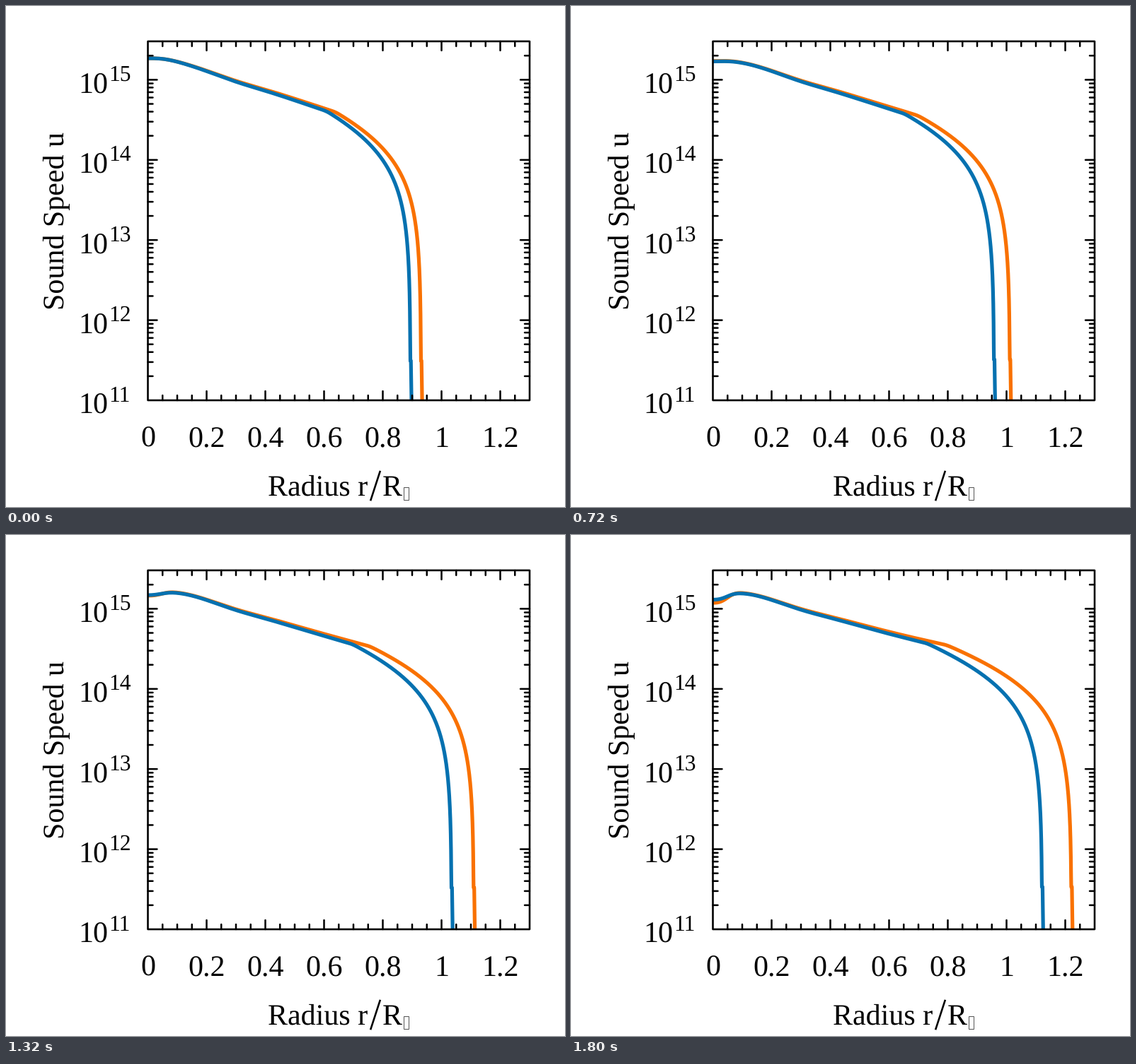
These frames come from a looping animation (790x709 px, 3.86 s). A matplotlib script:

```python
import numpy as np
import matplotlib.pyplot as plt
from matplotlib.animation import FuncAnimation
from matplotlib.collections import LineCollection
from matplotlib.patches import Rectangle

plt.rcParams["font.family"] = "Liberation Serif"
plt.rcParams["text.hinting"] = "none"

W, H, DPI = 790, 709, 64          # a power of two keeps the pixel size exact
PT = 72 / DPI                     # points per pixel
TICK_MS, STEP_MS, LOOP_MS = 20, 60, 3860
LAST = 30                         # the curves rest from this step on

LEFT, RIGHT, TOP, BOTTOM = 200.5, 740, 50, 558
UNIT, DECADE = 415, 113.4         # pixels per radius unit and per decade
ORANGE, BLUE = "#F97100", "#0571b0"


def px(r):
    return LEFT + UNIT * r


def py(u):
    return BOTTOM - DECADE * (np.log10(u) - 11)


def growth(n):
    """Share of the full expansion reached at step n; it speeds up with age."""
    return np.interp(n, [0, 8, 12, 17, 22, 27, LAST],
                     [0, .182, .279, .432, .617, .81, 1])


def smoothstep(t):
    t = np.clip(t, 0, 1)
    return t * t * (3 - 2 * t)


def core_height(r, age, slope, broad, narrow):
    """Height of the profile inside the convective envelope."""
    c = .08
    y = 74 + slope * (np.cbrt(r ** 3 + c ** 3) - c)
    y += 1.8 * np.exp(-((r - .3) / .1) ** 2) - 28 * age * r ** 2.5
    # the centre sinks, first broadly, later in a narrow dip
    y += broad * np.sin(age * np.pi / 2) * np.exp(-(r / .1) ** 2)
    y += narrow * smoothstep((age - .4) / .55) * np.exp(-(r / .058) ** 3)
    return y


def envelope_height(r, size, scale):
    """u falls with 1/r - 1/R, a little faster close to the surface."""
    d = np.maximum(1 / np.maximum(r, 1e-3) - 1 / size, 1e-6)
    return py(scale * d * (1 - .25 / (1 + d / .02)))


def profile(n, first, last, scale, slope, broad, narrow):
    age = growth(n)
    edge = first + age * (last - first)
    size = (edge - LEFT) / UNIT
    r = size * (1 - (1 - np.linspace(0, 1, 500)) ** 3)
    soft = .6
    y = soft * np.logaddexp(core_height(r, age, slope, broad, narrow) / soft,
                            envelope_height(r, size, scale) / soft)
    # the atmosphere starts with a small sideways step
    cut = 502 - 4 * n / LAST
    return (np.append(px(r), [edge + .7, edge + 1.6]),
            np.append(np.minimum(y, cut), [cut, BOTTOM + 2]))


STARS = [
    (ORANGE, dict(first=586.5, last=707.2, scale=8.15e14, slope=136, broad=9, narrow=13)),
    (BLUE, dict(first=571.5, last=665.7, scale=7.8e14, slope=141.5, broad=10.5, narrow=7)),
]

fig = plt.figure(figsize=(W / DPI, H / DPI), dpi=DPI, facecolor="white")
ax = fig.add_axes([0, 0, 1, 1])
ax.set_xlim(0, W)
ax.set_ylim(H, 0)
ax.axis("off")


def label(x, y, text, size=42, **kw):
    ax.text(x, y, text, fontsize=size * PT, va="baseline", color="black", **kw)


def box(**kw):
    return Rectangle((LEFT, TOP), RIGHT - LEFT, BOTTOM - TOP, **kw)


def ticks():
    marks = []
    for i in range(1, 26):
        x, size = px(i * .05), 7 if i % 4 else 13
        marks += [[(x, BOTTOM), (x, BOTTOM - size)], [(x, TOP), (x, TOP + size)]]
    for power in range(11, 16):
        for k in range(1, 10):
            y, size = py(k * 10.0 ** power), 7 if k > 1 else 13
            if TOP + 2 < y < BOTTOM - 2:
                marks += [[(LEFT, y), (LEFT + size, y)], [(RIGHT, y), (RIGHT - size, y)]]
    return marks


ax.add_collection(LineCollection(ticks(), colors="black", linewidths=2.5 * PT,
                                 capstyle="round", snap=False, zorder=4))
ax.add_patch(box(fill=False, ec="black", lw=2.6 * PT, joinstyle="round",
                 snap=False, zorder=5))

for i in range(7):
    label(px(i / 5), 624, f"{i / 5:g}", ha="center")
for power in range(11, 16):
    y = py(10.0 ** power)
    label(102.8, y + 19, "10")
    label(145.3, y + 1.5, str(power), 31.5)

label(82, 304.3, "Sound Speed u", ha="center", rotation=90, rotation_mode="anchor")
label(370.5, 692.7, "Radius r")
ax.plot([515.5, 528.5], [699, 659], color="black", lw=2.6 * PT)
label(532, 692.7, "R")
ax.add_patch(Rectangle((561.5, 680.5), 7, 18, fill=False, ec="#555555", lw=PT))

lines = []
for color, _ in STARS:
    line, = ax.plot([], [], color=color, lw=5.2 * PT, solid_joinstyle="round", zorder=3)
    line.set_clip_path(box(transform=ax.transData))
    lines.append(line)


def update(i):
    n = min(i * TICK_MS // STEP_MS, LAST)
    for (_, shape), line in zip(STARS, lines):
        line.set_data(*profile(n, **shape))
    return lines


anim = FuncAnimation(fig, update, frames=LOOP_MS // TICK_MS, interval=TICK_MS,
                     repeat=True, repeat_delay=0)
plt.show()
```
